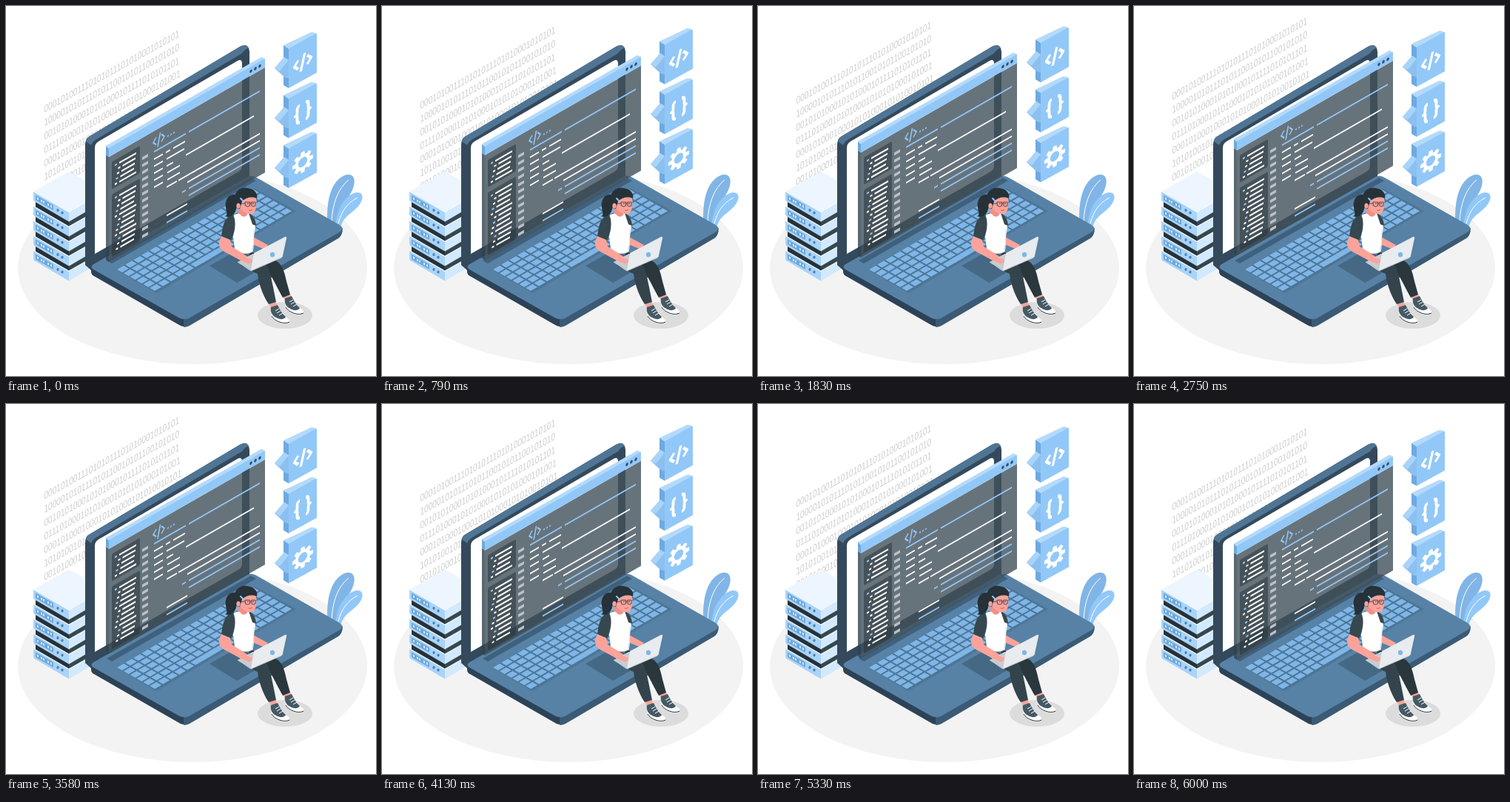
Recreate the animation shown at these times as an HTML page with a canvas. Size 500 by 500 pixels, loop 6040 ms.

```html
<!DOCTYPE html>
<html lang="en">
<head>
<meta charset="utf-8">
<title>Programming</title>
<style>
  html, body { margin: 0; width: 100%; height: 100%; overflow: hidden; background: #fff; }
  canvas { display: block; width: 500px; height: 500px; }
</style>
</head>
<body>
<canvas id="stage" width="500" height="500"></canvas>
<script>
const ctx = document.getElementById('stage').getContext('2d');
const LOOP = 6040;
const SLOPE = 0.573;
const SKY = '#92c8f8', DARK = '#263238', STEEL = '#5782a5', SKIN = '#fba39b';

// Linear there-and-back: 0 -> 1 -> 0 over one period
const swing = (t, period) => 1 - Math.abs(1 - 2 * (t % period) / period);

function fill(color, d) {
  ctx.fillStyle = color;
  ctx.fill(new Path2D(d));
}
function line(color, width, d, cap = 'butt') {
  ctx.strokeStyle = color;
  ctx.lineWidth = width;
  ctx.lineCap = cap;
  ctx.lineJoin = 'round';
  ctx.stroke(new Path2D(d));
}
function oval(color, x, y, rx, ry = rx) {
  ctx.fillStyle = color;
  ctx.beginPath();
  ctx.ellipse(x, y, rx, ry, 0, 0, Math.PI * 2);
  ctx.fill();
}
function at(x, y, draw) {
  ctx.save();
  ctx.translate(x, y);
  draw();
  ctx.restore();
}
// Plane rising to the right (dir -1) or falling to the right (dir 1)
function plane(x, y, dir, draw) {
  ctx.save();
  ctx.transform(1, dir * SLOPE, 0, 1, x, y);
  draw();
  ctx.restore();
}

const BITS = [
  '000101001110101011101010001010101',
  '100001010111010110010101100101010',
  '001010100010101000101111010101101',
  '011101000101010001010101000101001',
  '000101000100010101000101010010101',
  '101010010100010101001010100010101',
  '001010001010100101010001010100101'
];

function binary(shift) {
  ctx.save();
  ctx.font = '14px "Liberation Sans", Arial, sans-serif';
  ctx.fillStyle = '#cdcdcd';
  ctx.transform(0.722, -0.408, 0, 1, 51.5, 144.5 - shift);
  BITS.forEach((row, i) => ctx.fillText(row, 0, i * 18.3));
  ctx.restore();
}

function servers() {
  for (let i = 4; i >= 0; i--) {
    at(37, 250.5 + i * 20, () => {
      if (i < 4) {
        fill(DARK, 'M3 12L48 38V47L3 21Z');
        fill('#37474f', 'M48 38L92 12V22L48 47Z');
      }
      fill('#edf6ff', 'M0 0L48 -27L96 0L48 28Z');
      fill('#a9d4fa', 'M0 0L48 28V41L2 14Q0 13 0 11Z');
      fill('#d3e9fd', 'M48 28L96 0V13L48 41Z');
      line('#f6fbff', 1, 'M0 0L48 28L96 0');
      plane(0, 0, 1, () => {
        ctx.fillStyle = '#6fa8da';
        ctx.fillRect(3, 3, 24, 7);
        ctx.fillStyle = '#d3e9fd';
        for (const x of [5, 10, 13, 19, 23]) ctx.fillRect(x, 5, 2, 3);
      });
      oval('#4f7fa8', 33, 25.5, 1.6, 2);
      oval('#4f7fa8', 39, 29, 1.6, 2);
    });
  }
}

function plant() {
  fill('#80b5e6', 'M435 297C432 270 437 238 457 229C467 225 473 231 470 243C466 260 448 270 446 299Z');
  fill(SKY, 'M445 300C446 276 457 256 473 252C483 251 484 259 478 268C470 280 456 282 452 300Z');
  line('#fff', 1, 'M440 292C441 268 448 247 463 235');
  line('#fff', 1, 'M449 294C453 278 461 266 475 259');
}

function laptop() {
  fill('#34495c', 'M107 187Q107 179 113 176L316 55Q328 49 329 62V233L115 357L107 350Z');
  fill('#507594', 'M108 183Q109 178 113 176L316 55Q325 50 328 57Q324 57 319 64L124 179Q118 182 115 188Z');
  fill('#fff', 'M120 192Q120 186 125 183L313 74Q319 71 319 78V216Q319 221 314 224L120 335Z');

  fill('#2c4257', 'M115 352V359Q115 363 119 365L234 431Q240 435 246 431V418L130 350Z');
  fill('#3b5a75', 'M240 420V434Q244 434 248 432L449 314Q455 310 455 300Z');
  fill(STEEL, 'M118 356Q112 352 120 348L326 231Q331 228 337 231L451 296Q458 301 450 306L247 422Q240 425 233 421Z');
  fill('#3f617e', 'M136 344L331 232L338 236L143 348Z');

  fill('#4d7595', 'M149 356L337 247L392 277L203 388Z');
  const cols = 17, rows = 6;
  const spot = (c, r) => [150 + c * 187 / cols + r * 53 / rows,
                          356 - c * 109 / cols + r * 30 / rows];
  ctx.fillStyle = '#7fb6e8';
  for (let r = 0; r < rows; r++) {
    for (let c = 0; c < cols; c++) {
      const wide = r === rows - 1 && c > 4 && c < 8;
      const end = c + (wide ? 1.02 : 0.82);
      ctx.beginPath();
      for (const [a, b] of [[c, r], [end, r], [end, r + 0.78], [c, r + 0.78]]) ctx.lineTo(...spot(a, b));
      ctx.fill();
    }
  }
  fill('#456884', 'M275 351L314 329L352 351L312 374Z');
}

// Code rows: height, colour key, then start/end pairs
const CODE = [
  [232, 'b', 61, 104, 108, 204],
  [242, 'w', 61, 73, 77, 83, 87, 103],
  [251.5, 'w', 61, 73, 78, 102],
  [261, 'w', 61, 73, 78, 87, 104, 196],
  [270.5, 'w', 61, 73, 79, 96],
  [280, 'w', 61, 73, 79, 96],
  [289.5, 'w', 78, 92, 94, 204],
  [299, 'w', 106, 204],
  [308.5, 'b', 99, 104, 108, 204],
  [318, 'b', 108, 204],
  [328, 'w', 78, 106],
  [337.5, 'b', 78, 106]
];

function sideRows(top, count) {
  for (let i = 0; i < count; i++) {
    const y = top + i * 6.4, indent = (i * 3 % 4) * 1.5;
    line(i % 3 ? '#fff' : SKY, 2.3, `M${8 + indent} ${y}h3`);
    line('#fff', 2.3, `M${14 + indent} ${y}H${37 - i * 5 % 4}`);
  }
}

function codeWindow(shift) {
  at(0, -shift, () => {
    fill('rgba(48,66,79,.8)', 'M135 201L139 204V346L135 343Z');
    fill('#6ea9dc', 'M135 189L139 192V204L135 201Z');
    fill('#b4dafb', 'M135 189L345 69Q347 69 350 72L139 193Z');
    plane(139, 0, -1, () => {
      ctx.fillStyle = 'rgba(65,81,91,.8)';
      ctx.fillRect(0, 204, 211, 142);
      ctx.fillStyle = SKY;
      ctx.fillRect(0, 192, 211, 12);
      for (const x of [192, 198, 204]) oval('#34526c', x, 198, 1.8, 2.1);

      ctx.fillStyle = 'rgba(38,50,56,.5)';
      ctx.beginPath();
      ctx.roundRect(4, 213, 38, 37, 2);
      ctx.roundRect(4, 257, 38, 85, 2);
      ctx.fill();
      sideRows(220, 5);
      sideRows(264, 12);

      ctx.fillStyle = '#b9c1c6';
      for (let i = 0; i < 12; i++) ctx.fillRect(45, 230 + i * 9.6, 8, 4);

      line(SKY, 1.7, 'M64 214L60 219L64 224M69.5 211L66 228M71 214L75 219L71 224');
      for (const x of [80, 84, 88]) oval(SKY, x, 221.5, 1.1);
      for (const [y, key, ...ends] of CODE) {
        for (let i = 0; i < ends.length; i += 2) {
          line(key === 'b' ? SKY : '#fff', 2, `M${ends[i]} ${y}H${ends[i + 1]}`);
        }
      }
    });
  });
}

function shoe(x, y) {
  at(x, y, () => {
    fill('#fff', 'M0 4C-1 13 3 18 12 22C20 25 26 23 25 18C21 15 16 11 14 7Z');
    fill('#455a64', 'M0 1L9 -2C12 4 15 10 20 14C18 18 12 18 7 15C1 12 -1 7 0 1Z');
    line('#fff', 1, 'M6 6L11 3M8 9L13 6M11 12L16 9');
    line(DARK, 1, 'M1 13C5 20 18 25 25 21');
  });
}

function woman() {
  oval('#dcdcdc', 377, 418, 37, 18);
  fill(SKIN, 'M332 311L354 323L350 329L328 320Z');
  fill(SKIN, 'M355 401L364 399L368 408L359 410Z');
  fill(SKIN, 'M374 391L384 389L387 398L378 400Z');
  shoe(377, 394);
  shoe(358, 406);
  fill('#2a373d', 'M330 332L362 343C373 347 376 358 379 372L384 390L374 394C368 384 362 370 354 358L325 345Z');
  fill('#34444c', 'M311 330L350 349C356 352 358 366 361 380L365 400L355 403C346 390 341 372 340 362L318 351Z');

  fill('#f08f88', 'M314 273L327 277L328 286C323 292 316 289 313 282Z');
  fill('#fff', 'M305 285C309 281 313 280 316 281C319 286 325 286 327 280C335 284 339 294 336 304L333 332C326 336 316 334 309 331C309 315 303 300 305 285Z');
  line('#e3e8eb', 1, 'M335 301C333 312 336 322 333 332C326 336 316 334 309 331');
  fill('#37474f', 'M307 282C297 284 293 293 291 311L304 317C309 308 312 292 307 282Z');
  fill('#37474f', 'M328 280C334 283 338 290 338 297L333 295Z');
  fill(SKIN, 'M291 311C286 321 287 327 295 332L323 347C331 350 336 347 332 342L305 325L303 316Z');

  fill(SKIN, 'M315 255L337 254C339 266 339 275 335 280C329 284 318 278 315 271Z');
  fill(DARK, 'M313 256C302 251 295 262 297 272C298 280 300 283 296 284C305 288 312 279 312 268Z');
  fill(DARK, 'M309 267C306 252 316 244 326 246C336 247 341 254 339 260C331 257 324 259 319 264L316 274Q311 274 309 267Z');
  oval(SKIN, 314, 270, 2.6, 3.5);
  line(SKY, 2, 'M317 260L321 264', 'round');
  line(DARK, 0.8, 'M317 267L323 267M323 265h6.5v5q-3 2 -6 0zM331.5 265h5.5v5q-3 2 -5 0zM329.5 267h2');
  oval(DARK, 327, 267, 0.8);
  oval(DARK, 334, 267, 0.8);
  line('#c9605f', 1, 'M328 276Q331 277 333 275');

  fill('#c7ccd0', 'M313 346L333 335L375 338L331 358Z');
  fill(SKIN, 'M317 337L331 342C335 345 332 349 327 348L315 343Z');
  fill('#e9ecee', 'M335 334L377 312Q380 311 379 314L374 337Q373 340 371 341L331 358Z');
  line('#c3c9cd', 1, 'M313 346L331 358L372 340');
  oval('#7fb6e8', 360, 336, 3.2, 3.2);
}

function gear() {
  ctx.strokeStyle = '#fff';
  ctx.lineWidth = 4;
  ctx.beginPath();
  ctx.arc(0, 0, 8.2, 0, Math.PI * 2);
  ctx.stroke();
  for (let i = 0; i < 8; i++) {
    ctx.save();
    ctx.rotate(i * Math.PI / 4);
    fill('#fff', 'M-3.2 -9L-2.3 -14H2.3L3.2 -9Z');
    ctx.restore();
  }
}
const ICONS = [
  () => line('#fff', 3.5, 'M-6 -6L-11.5 0L-6 6M2.8 -11L-2.8 11M6 -6L11.5 0L6 6'),
  () => line('#fff', 3.8, 'M-4 -11.5Q-7.5 -11.5 -7.5 -7V-3Q-7.5 0 -10 0Q-7.5 0 -7.5 3V7Q-7.5 11.5 -4 11.5M4 -11.5Q7.5 -11.5 7.5 -7V-3Q7.5 0 10 0Q7.5 0 7.5 3V7Q7.5 11.5 4 11.5'),
  gear
];

function badges(shift) {
  ICONS.forEach((icon, i) => at(0, i * 67.5 - shift, () => {
    fill('#6eaae0', 'M375 53L382 57V111L375 107Z');
    fill('#8cc0f0', 'M363 84L376 69L382 73V98L376 96Z');
    fill('#a9d4fa', 'M363 84L376 69L382 73L370 88Z');
    fill('#b4dafb', 'M375 53L412 35.5Q414 34.5 420 37.5L382 58Z');
    fill(SKY, 'M382 57.5L418 37.5Q420 36.5 420 38.5V90L382 111Z');
    plane(401, 76, -1, icon);
  }));
}

function draw(t) {
  ctx.fillStyle = '#fff';
  ctx.fillRect(0, 0, 500, 500);
  oval('#f3f3f3', 252, 354, 236, 130);
  const rise = swing(t, LOOP);
  binary(19 * rise);
  servers();
  plant();
  laptop();
  codeWindow(10 * rise);
  woman();
  badges(10 * swing(t, LOOP / 2));
}

const start = performance.now();
function frame() {
  draw((performance.now() - start) % LOOP);
  requestAnimationFrame(frame);
}
frame();
</script>
</body>
</html>
```
